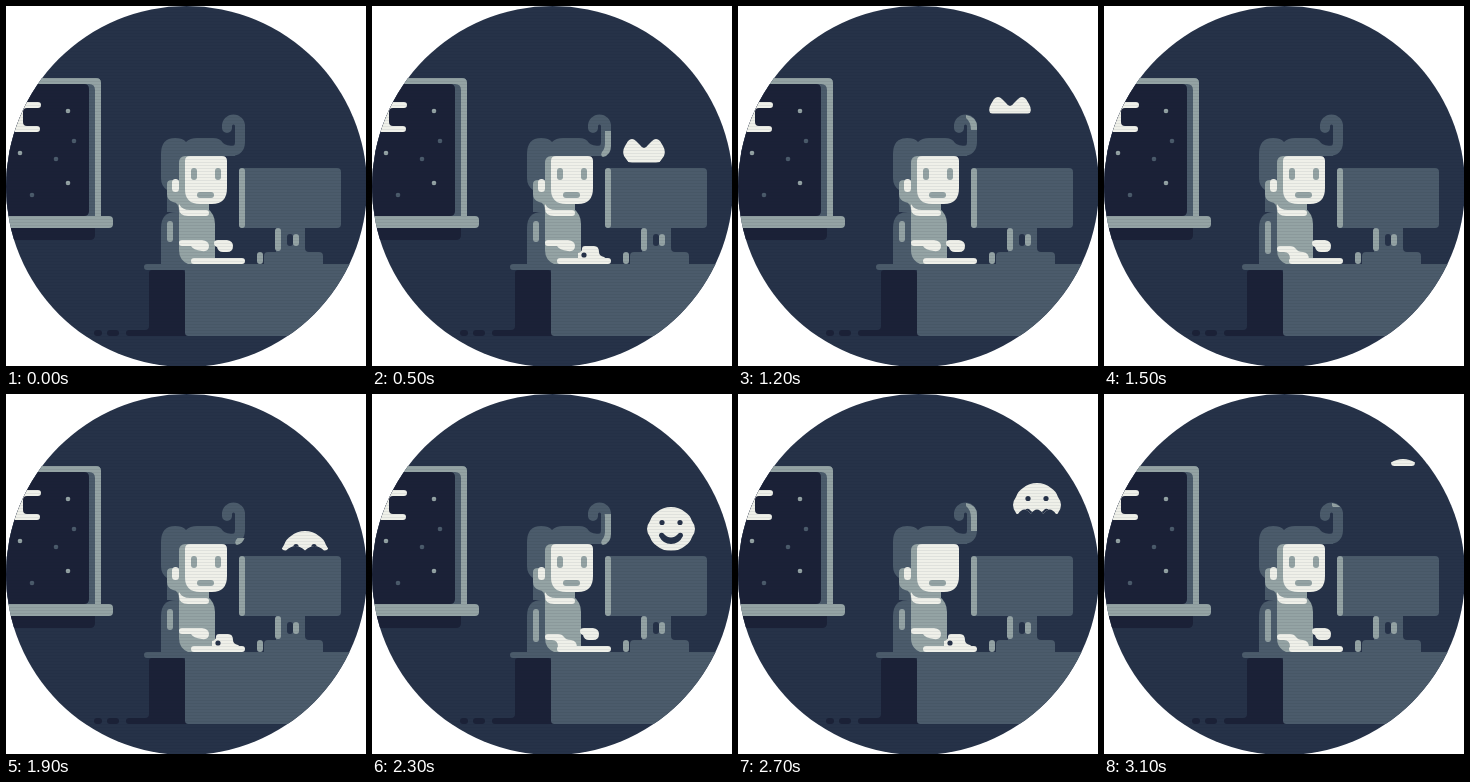
An HTML page for the animation above (3.2 s loop, 360x360 px).

```html
<!DOCTYPE html>
<html lang="en">
<head>
<meta charset="utf-8">
<title>Night typing</title>
<style>
  html, body { margin: 0; width: 100%; height: 100%; overflow: hidden; background: #fff; }
  svg { display: block; width: 100vw; height: 100vh; }
  .night { fill: #1b2137 }
  .room { fill: #263248 }
  .slate { fill: #4b5b6b }
  .grey { fill: #94a3a4 }
  .white { fill: #eff0e9 }
</style>
</head>
<body>
<svg viewBox="0 0 360 360">
  <defs>
    <clipPath id="disc"><circle cx="180.5" cy="180.5" r="180.5"/></clipPath>
    <clipPath id="heartClip"><path/></clipPath>
    <clipPath id="smileClip"><path/></clipPath>
    <clipPath id="glowClip"><rect x="200" width="50"/></clipPath>
    <pattern id="lines" width="3" height="3" patternUnits="userSpaceOnUse">
      <rect width="3" height="1" fill="#101828" opacity=".07"/>
    </pattern>
  </defs>
  <g clip-path="url(#disc)">
    <rect class="room" width="360" height="360"/>

    <g id="window">
      <path class="slate" d="M0 72H90Q95 72 95 77V211H0Z"/>
      <path class="grey" d="M0 72H90Q95 72 95 77V211H89V84Q89 78 83 78H0Z"/>
      <path class="night" d="M0 78H78Q83 78 83 83V205Q83 210 78 210H0Z"/>
      <path class="white" d="M0 96H32a3 3 0 0 1 0 6H21Q17 102 17 106V116Q17 120 21 120H31a3 3 0 0 1 0 6H0Z"/>
      <g id="stars"></g>
      <path class="grey" d="M0 210H103Q107 210 107 214V218Q107 222 103 222H0Z"/>
      <path class="night" d="M0 222H89V229Q89 234 84 234H0Z"/>
    </g>

    <g id="hair">
      <path class="slate" d="M155 148Q155 132 169 132Q177 132 180 136Q184 132 191 132H207Q214 132 217 137Q220 140 229 140V150H181V206H161V184Q155 180 155 172Z"/>
      <path fill="none" stroke="#4b5b6b" stroke-width="10" stroke-linecap="round"
        d="M206 145H225Q234 145 234 136V120A6.5 6.5 0 0 0 221 120V122"/>
      <path class="grey" clip-path="url(#glowClip)"
        d="M228 109Q239 111 239 121V140Q239 149 231 151Q228 150 230 146Q233 143 233 137V124Q233 116 228 112Z"/>
    </g>

    <g id="person">
      <path class="slate" d="M170 206Q155 206 155 222V258H190V206Z"/>
      <path class="grey" d="M166 174H178V206H173Q173 196 167 196Q161 194 161 188V178Q161 174 166 174Z"/>
      <path class="grey" d="M173 202H201Q209 208 209 218V258H182Q173 254 173 244Z"/>
      <rect class="grey" x="173" y="150" width="24" height="50" rx="6"/>
      <path class="grey" d="M178 194H203V206H178Z"/>
      <path class="white" d="M184 150H216Q221 150 221 155V182Q221 198 206 198H194Q179 198 179 183V155Q179 150 184 150Z"/>
      <rect class="white" x="166" y="173" width="7" height="13" rx="3.5"/>
      <path class="white" d="M173 198Q176 204 184 204H200a3 3 0 0 1 0 6H182Q173 210 173 202Z"/>
      <g id="eyes" class="grey">
        <rect x="185" y="162" width="6" height="12" rx="3"/>
        <rect x="209" y="162" width="6" height="12" rx="3"/>
      </g>
      <rect class="grey" x="191" y="186" width="17" height="6" rx="3"/>
      <g id="leftUp">
        <rect class="grey" x="161" y="215" width="6" height="21" rx="3"/>
        <path class="white" d="M176 234H196Q203 235 203 240Q203 246 196 245Q187 244 185 240H176a3 3 0 0 1 0-6Z"/>
      </g>
      <g id="leftDown">
        <rect class="grey" x="161" y="215" width="6" height="33" rx="3"/>
        <path class="white" d="M176 240H186Q190 240 192 243Q194 246 199 246Q205 247 205 253H186Q186 246 180 246H176a3 3 0 0 1 0-6Z"/>
      </g>
      <path id="rightUp" class="white" d="M212 234H221Q227 235 227 240Q227 246 221 246H217Q212 246 211 241Q208 240 208 237Q208 234 212 234Z"/>
      <g id="rightDown">
        <path class="white" d="M213 240H222Q227 240 227 246Q227 250 232 251L236 254H206V247Q210 246 210 243Q210 240 213 240Z"/>
        <circle class="room" cx="212" cy="249" r="2.6"/>
      </g>
      <rect class="white" x="185" y="252" width="54" height="6" rx="3"/>
    </g>

    <g id="desk">
      <path class="slate" d="M141 258H360V330H182Q179 330 179 327V264H141a3 3 0 0 1 0-6Z"/>
      <path class="night" d="M146 264H176Q179 264 179 268V327Q179 330 182 330H123a3 3 0 0 1 0-6H139Q143 324 143 320V267Q143 264 146 264Z"/>
      <rect class="night" x="101" y="324" width="12" height="6" rx="3"/>
      <rect class="night" x="88" y="324" width="8" height="6" rx="3"/>
    </g>

    <g id="monitor">
      <rect class="slate" x="233" y="162" width="102" height="60" rx="4"/>
      <rect class="grey" x="233" y="162" width="6" height="60" rx="3"/>
      <path class="slate" d="M270 221H299V242Q299 246 303 246H313Q317 246 317 250V258H258V250Q258 246 262 246H270Z"/>
      <rect class="grey" x="269" y="222" width="6" height="23" rx="3"/>
      <rect class="room" x="281" y="228" width="6" height="12" rx="3"/>
      <rect class="grey" x="287" y="228" width="6" height="12" rx="3"/>
      <rect class="grey" x="251" y="246" width="6" height="12" rx="3"/>
    </g>

    <g id="heart" clip-path="url(#heartClip)">
      <path class="white" d="M272 9Q274 9 276 6L280 2Q284 -2 288 2L291 7Q294 12 292 17L287 24L275 35Q272 38 269 35L257 24L252 17Q250 12 253 7L256 2Q260 -2 264 2L268 6Q270 9 272 9Z"/>
    </g>
    <g id="smile" clip-path="url(#smileClip)">
      <g>
        <path class="white" d="M299 0Q307 0 313 5Q318 8 320 14Q326 22 320 30Q318 36 313 39Q307 44 299 44Q291 44 285 39Q280 36 278 30Q272 22 278 14Q280 8 285 5Q291 0 299 0Z"/>
        <circle class="room" cx="290" cy="15.500" r="2.6"/>
        <circle class="room" cx="308" cy="15.500" r="2.6"/>
        <path class="room" d="M287 29Q287 25 291 26Q299 35 307 26Q311 25 311 29Q307 37 299 37Q291 37 287 29Z"/>
      </g>
    </g>
    <rect width="360" height="360" fill="url(#lines)"/>
  </g>
</svg>
<script>
const STEP = 100, STEPS = 32, RISE = 6, MELT = 12, SCREEN_TOP = 156.5;
// One flag per step: which hand is pressing the keys.
const LEFT = "00100011", RIGHT = "01010110";
const BLINK = 27;
const $ = s => document.querySelector(s);
const show = (s, on) => $(s).style.display = on ? "" : "none";

const stars = [[62, 105, 1], [68, 135, 0], [50, 153, 0], [14, 147, 1], [26, 189, 0], [62, 177, 1]];
$("#stars").innerHTML = stars.map(([x, y, lit]) =>
  `<circle cx="${x}" cy="${y}" r="2.3" class="${lit ? "grey" : "slate"}"/>`).join("");

const bubbles = [
  { id: "heart", x: 272, half: 21, start: 1, end: 14, top: 163, melt: n => 107.5 - MELT * (n - 12) },
  { id: "smile", x: 299, half: 24, start: 17, end: 31, top: 251, melt: n => 120 - MELT * (n - 27), wavy: true }
];

// Visible part of a bubble: a box with rounded lower corners and optional arches cut from below.
function maskPath(x, half, top, bottom, round, arches, depth) {
  const l = x - half, r = x + half;
  let d = `M${l} ${top}H${r}V${bottom - round}Q${r} ${bottom} ${r - round} ${bottom}`;
  const w = 2 * (half - round) / (arches || 1);
  for (let i = 0; i < arches; i++) d += `q${-w / 2} ${-2 * depth} ${-w} 0`;
  return d + `H${l + round}Q${l} ${bottom} ${l} ${bottom - round}Z`;
}

function drawBubble(b, n) {
  const top = b.top - RISE * n;
  const bottom = Math.min(SCREEN_TOP, b.melt(n));
  const h = bottom - top;
  const on = n >= b.start && n <= b.end && h > 1;
  show("#" + b.id, on);
  if (!on) return;
  $(`#${b.id} > *`).setAttribute("transform", `translate(0 ${top})`);
  const melting = bottom < SCREEN_TOP;
  const wavy = b.wavy && h > 14 && h < 42;
  const round = wavy ? 5 : melting ? Math.min(3.5, h / 2) : Math.min(9, h / 2);
  const half = Math.min(b.half, h + 5);
  const arches = wavy ? (melting ? 3 : 2) : 0;
  $(`#${b.id}Clip path`).setAttribute("d", maskPath(b.x, half, top, bottom, round, arches, 4.5));
}

function draw(n) {
  bubbles.forEach(b => drawBubble(b, n));

  // The light on the curl climbs together with the bubble.
  const glow = $("#glowClip rect");
  glow.setAttribute("y", (n < 16 ? 155 : 258) - RISE * n);
  glow.setAttribute("height", n ? 41 : 0);

  const left = LEFT[n % 8] === "1", right = RIGHT[n % 8] === "1";
  show("#leftUp", !left);
  show("#leftDown", left);
  show("#rightUp", !right);
  show("#rightDown", right);
  show("#eyes", n !== BLINK);
}

let last = -1;
function tick(now) {
  const n = Math.floor(now / STEP) % STEPS;
  if (n !== last) draw(last = n);
  requestAnimationFrame(tick);
}
draw(0);
requestAnimationFrame(tick);
</script>
</body>
</html>
```
